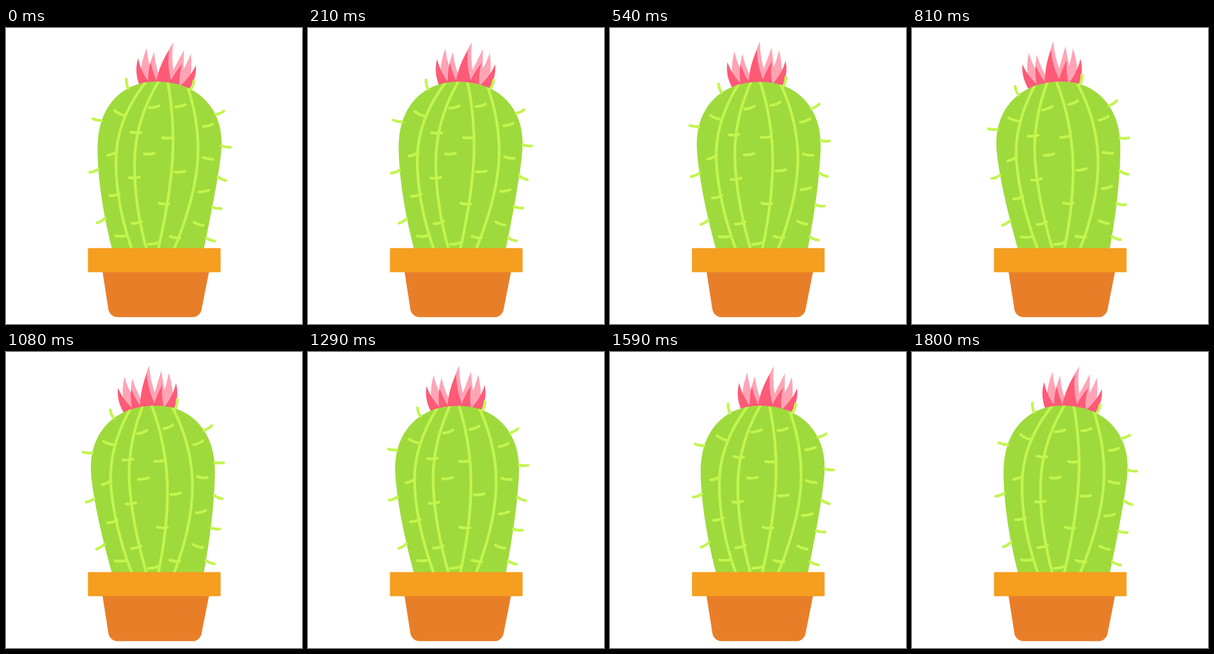
Write an HTML page with a canvas that moves like this. It is 540 by 540 pixels and loops after 1.83 s.

```html
<!DOCTYPE html>
<html lang="en">
<head>
<meta charset="utf-8">
<title>Swaying cactus</title>
<style>
html, body { margin: 0; height: 100%; overflow: hidden; background: #fff; }
canvas { display: block; width: 100vw; height: 100vh; }
</style>
</head>
<body>
<canvas id="stage" width="540" height="540"></canvas>
<script>
const ctx = document.getElementById('stage').getContext('2d');
const AXIS = 273, TOP = 98.5, BELLY = 215, SOIL = 402, BURIED = 412;
const GREEN = '#9fda3c', LIME = '#c2f54e', PINK = '#ff5a76', BLUSH = '#ffa4b5';
const RIM = '#f59e1f', CLAY = '#e87f28';

// Bends the upright plant around its base: the tilt grows with height.
function bend([x, y], lean) {
  const h = SOIL - y, u = x - AXIS;
  const tilt = lean * (0.0077 + 0.000302 * h);
  const shift = lean * (0.0077 * h + 0.000151 * h * h);
  return [AXIS + shift + u * Math.cos(tilt), y + u * Math.sin(tilt)];
}

// Half the body's width: a superellipse above the belly, a taper below it.
function halfWidth(y) {
  if (y < BELLY) {
    const v = (BELLY - y) / (BELLY - TOP);
    return 113 * Math.max(0, 1 - v ** 2.2) ** (1 / 2.2);
  }
  return 113 - 29 * ((y - BELLY) / (SOIL - BELLY)) ** 1.5;
}

// The foot of the plant stands slightly to the right.
const middle = y => AXIS + 0.4 + 3.6 * (Math.max(0, y - BELLY) / (SOIL - BELLY)) ** 2;

function sample(count, point) {
  return Array.from({ length: count + 1 }, (_, i) => point(i / count));
}

const body = sample(100, t => {
  const s = 2 * t - 1, y = TOP + (BURIED - TOP) * s * s;
  return [middle(y) + Math.sign(s) * halfWidth(y), y];
});

// Offsets from the middle at the top, the widest part and the soil.
const ribs = [[-33, -78, -48], [-12, -44, -21], [6, 25, 1], [41, 71, 30]]
  .map(([top, wide, foot]) => sample(40, t => {
    const y = TOP - 5 + (BURIED - TOP + 5) * t, d = y - 235;
    const bow = d < 0 ? (top - wide) * (-d / 135) ** 2 : (foot - wide) * (d / 167) ** 1.8;
    return [middle(y) + wide + bow, y];
  }));

function spine(x, y, degrees, from, to) {
  const a = degrees * Math.PI / 180, mid = (from + to) / 2, sag = 2;
  const at = (r, s) => [x + r * Math.cos(a) - s * Math.sin(a), y + r * Math.sin(a) + s * Math.cos(a)];
  return [at(from, 0), at(mid, sag), at(to, 0)];
}

// Columns of evenly spaced spines: side (1 is the outline), first y, step, angles.
const spines = [
  [-0.76, 161, 73, [23, -23, -14, -1]],
  [-0.4, 193.5, 81, [-1, -6, -14]],
  [-0.16, 145, 85, [-16, -6]],
  [-0.09, 393, 0, [-10]],
  [0.12, 199, 121, [-4, 3]],
  [0.36, 139, 121, [-18, -6, 7]],
  [0.8, 171, 61.5, [-18, 8, -12, 18]],
  [-1, 116, 0, [73]],
  [-1, 177, 86, [7, -22, -32]],
  [1, 107, 0, [-74]],
  [1, 149.5, 58, [-27, 4, 25, 8, 21]]
].flatMap(([side, first, step, angles]) => angles.map((deg, i) => {
  const y = first + i * step, x = middle(y) + side * halfWidth(y);
  return Math.abs(side) === 1 ? spine(x, y, deg, 0, side * 16.5) : spine(x, y, deg, -9, 9);
}));

// A petal fans out from the crown; curl bows both of its edges sideways.
function petal([dx, tipY, curl]) {
  const baseY = 110, half = (baseY - tipY) * 0.24, base = AXIS + dx * 0.62, tip = AXIS + dx;
  const edge = side => [(base + side * half + tip) / 2 + curl, (baseY + tipY) / 2];
  return [[base - half, baseY], edge(-1), [tip, tipY], edge(1), [base + half, baseY]];
}
const backPetals = [[-39, 41, -10], [-25, 46, -6], [8, 25, -10], [29, 36.5, -1], [42, 42, 8]].map(petal);
const frontPetals = [[-52.5, 60.5, -9], [-29, 65, -4], [2, 40, -9], [28.5, 62, -5], [53.5, 61.5, 9]].map(petal);

function polyline(p) {
  ctx.beginPath();
  for (const q of p) ctx.lineTo(...q);
}

function arcs(p) {
  ctx.beginPath();
  ctx.moveTo(...p[0]);
  for (let i = 1; i < p.length; i += 2) ctx.quadraticCurveTo(...p[i], ...p[i + 1]);
}

function drawPot() {
  ctx.fillStyle = CLAY;
  ctx.beginPath();
  ctx.moveTo(176, 444);
  ctx.arcTo(189, 527.5, 270, 527.5, 17);
  ctx.arcTo(354, 527.5, 370.5, 444, 17);
  ctx.lineTo(370.5, 444);
  ctx.fill();
  ctx.fillStyle = RIM;
  ctx.beginPath();
  ctx.roundRect(149.5, 401.5, 242, 44, 1.5);
  ctx.fill();
}

function draw(lean) {
  const pose = pts => pts.map(p => bend(p, lean));
  ctx.fillStyle = '#fff';
  ctx.fillRect(0, 0, 540, 540);

  for (const [petals, color] of [[backPetals, BLUSH], [frontPetals, PINK]]) {
    ctx.fillStyle = color;
    for (const p of petals) { arcs(pose(p)); ctx.fill(); }
  }

  ctx.strokeStyle = LIME;
  ctx.lineWidth = 5;
  ctx.lineCap = 'round';
  ctx.save();
  polyline(pose(body));
  ctx.fillStyle = GREEN;
  ctx.fill();
  ctx.clip();
  for (const rib of ribs) { polyline(pose(rib)); ctx.stroke(); }
  ctx.restore();
  for (const s of spines) { arcs(pose(s)); ctx.stroke(); }

  drawPot();
}

// 61 steps of 30 ms; the last step repeats the first pose.
function tick() {
  const step = Math.floor(performance.now() / 30) % 61;
  draw(Math.cos(step / 60 * 2 * Math.PI));
  requestAnimationFrame(tick);
}
tick();
</script>
</body>
</html>
```
